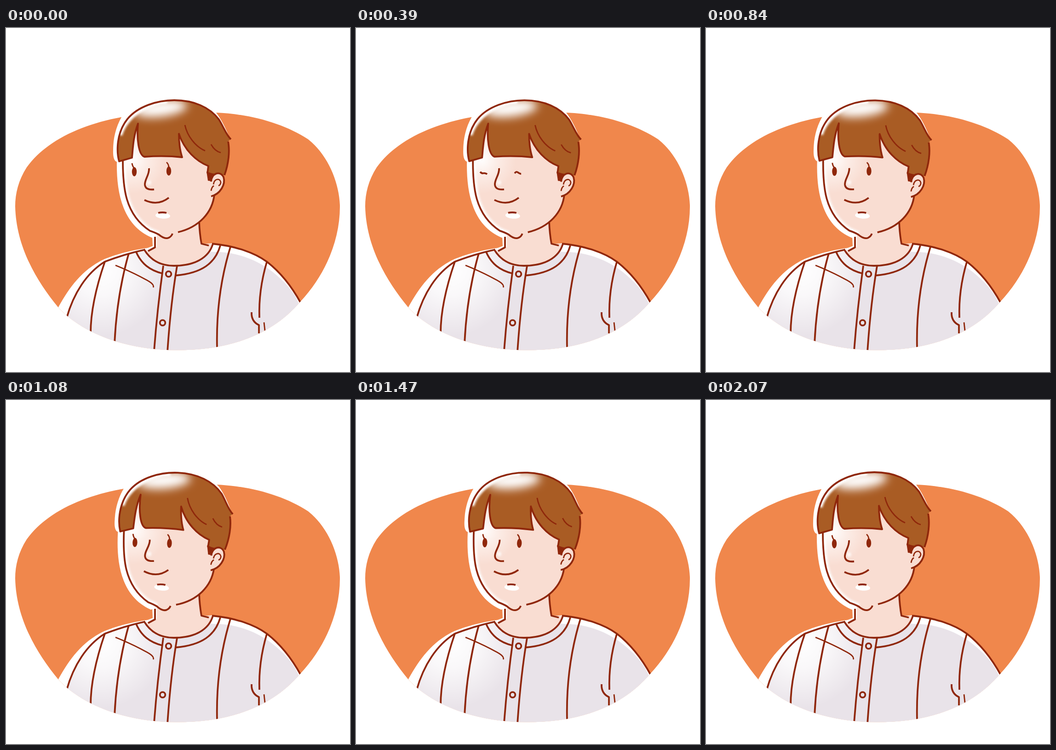
Write an HTML page that moves like this. It is 748 by 748 pixels and loops after 2100 ms.

```html
<!DOCTYPE html>
<html lang="en">
<head>
<meta charset="utf-8">
<title>Portrait</title>
<style>
  html, body { margin: 0; width: 100%; height: 100%; overflow: hidden; background: #fff; }
  svg { display: block; width: 100vw; height: 100vh; }
  .line { fill: none; stroke: #8f270b; stroke-width: 3.8; stroke-linejoin: round; }
  .thin { stroke-width: 2.8; }
  .ink { fill: #8f270b; }
</style>
</head>
<body>
<svg viewBox="0 0 748 748">
  <defs>
    <clipPath id="blobClip"><use href="#blob"/></clipPath>
    <clipPath id="hairClip"><use href="#hair"/></clipPath>
    <clipPath id="faceClip"><use href="#face"/></clipPath>
    <path id="blob" d="M250 194C163 210 86 246 45 303C27 331 20 360 20 388C22 475 66 550 114 608C165 663 260 700.5 370 700.5C480 700.5 575 672 641 594C695 536 727 460 726 385C724 335 700 276 657 242C603 207 530 187 457 184C385 180 310 183 250 194Z"/>
    <path id="hair" d="M246 290C240 268 240 228 264 198C286 171 328 157 366 157C408 157 443 172 463 199C473 215 479 233 488 241L483 247C487 268 484 295 476 320L450 318L438 315L440 300C414 290 388 266 376 232Q376 260 383 281Q345 277 301 280C288 276 284 240 287 208C277 235 276 258 274 282Z"/>
    <path id="face" d="M254 287C254 345 258 405 313 441Q325 445 332 449Q345 460 354 456Q360 453 361 447L374 444C420 433 448 400 453 364L470 330V260L380 200H270Z"/>
    <radialGradient id="shirtLight" gradientUnits="userSpaceOnUse" cx="205" cy="525" r="145">
      <stop offset="0" stop-color="#fff"/>
      <stop offset=".4" stop-color="#fff" stop-opacity=".75"/>
      <stop offset="1" stop-color="#fff" stop-opacity="0"/>
    </radialGradient>
    <radialGradient id="skin" gradientUnits="userSpaceOnUse" cx="272" cy="285" r="75">
      <stop offset="0" stop-color="#fff"/>
      <stop offset=".45" stop-color="#fcede7"/>
      <stop offset="1" stop-color="#f9ddd2"/>
    </radialGradient>
    <filter id="soft" x="-50%" y="-100%" width="200%" height="300%"><feGaussianBlur stdDeviation="10"/></filter>
    <filter id="crisp" x="-20%" y="-20%" width="140%" height="140%"><feGaussianBlur stdDeviation="2"/></filter>
  </defs>

  <use href="#blob" fill="#f0874c"/>

  <g clip-path="url(#blobClip)">
    <path fill="#fff" d="M110 614C135 568 163 526 215 502Q255 486 302 479L450 468C500 473 545 490 570 509C604 538 622 566 642 598V720H110Z"/>
    <path fill="#e9e3e9" d="M133 627C150 575 175 535 215 508Q260 490 304 482L460 487C505 488 548 506 578 529C605 550 628 575 637 600V720H133Z"/>
    <path fill="url(#shirtLight)" d="M133 627C150 575 175 535 215 508Q260 490 304 482L360 530V700H133Z"/>
    <g class="line">
      <path d="M132 630C147 577 175 533 215 508Q260 491 302 482"/>
      <path d="M448 469C500 474 541 489 567 508C602 535 624 567 641 598"/>
      <path d="M215 508Q184 598 184 664"/>
      <path d="M267 490Q241 580 236 686"/>
      <path d="M342 517Q329 610 322 702"/>
      <path d="M372 517Q358 600 351 704"/>
      <path d="M488 476Q456 580 459 697"/>
      <path d="M567 509Q549 570 551 630"/>
      <path d="M534 618Q533 638 550 646V664"/>
      <path class="thin" d="M561 640L563 658"/>
      <path class="thin" d="M238 516Q275 531 302 546Q324 557 320 564"/>
      <circle cx="353.5" cy="535" r="5.8"/>
      <circle cx="340.5" cy="641" r="5.8"/>
    </g>
  </g>

  <g class="head">
    <path fill="#fff" d="M487 240C476 215 469 200 457 184L420 150H290C252 178 233 220 233 265Q232 288 241 291C240 350 250 430 320 457L370 430Z"/>
  </g>

  <path fill="#fff" d="M318 452L329 448V480L304 484L306 479L319 474Z"/>
  <path fill="#f9ddd2" d="M328 438V476L304 485C319 510 342 517 365 517C410 517 442 500 450 470L424 468L419 405Z"/>
  <path class="line" d="M324 454V477L309 485M420 421Q421 447 425 469L441 473"/>
  <path class="line" d="M300 481C316 508 340 517 365 517C410 517 441 500 450 469M283 487C294 512 312 527 341 534M370 538C425 533 455 512 466 473"/>

  <g class="head">
    <use href="#face" fill="url(#skin)"/>
    <path clip-path="url(#faceClip)" d="M254 287C254 345 258 405 313 441L332 449" fill="none" stroke="#fff" stroke-width="13" filter="url(#crisp)"/>
    <path class="line" d="M254 287C254 345 258 405 313 441Q325 445 332 449Q345 460 354 456Q360 453 362 447M374 444C420 433 449 401 453 362"/>

    <use href="#hair" fill="#a95c24"/>
    <g clip-path="url(#hairClip)" fill="none" stroke="#fff">
      <ellipse cx="336" cy="175" rx="58" ry="18" transform="rotate(-7 336 175)" fill="#fff" stroke="none" filter="url(#soft)"/>
      <path d="M245 232Q250 214 264 198C286 171 328 157 350 157" stroke-width="16" filter="url(#crisp)"/>
    </g>
    <path class="line" d="M483 247C487 268 484 295 475 320M438 316L440 300C414 290 388 266 376 230Q376 260 383 281Q345 277 301 280C288 276 284 240 287 208C277 235 276 258 274 282L246 290C240 268 240 228 264 198C286 171 328 157 366 157C408 157 443 172 463 199C473 215 479 233 489 242"/>
    <path class="line thin" d="M389 211C394 235 412 258 433 267M446 253Q454 268 467 271"/>
    <path class="ink" d="M436 312Q446 316 454 317Q447 322 446 333L439 332Z"/>

    <path fill="#f9ddd2" d="M446 334C447 316 465 309 473 324C478 339 467 360 446 366Z"/>
    <path class="line" d="M446 334C447 316 465 309 473 324C478 340 466 361 446 366"/>
    <path class="line thin" d="M451 340C453 327 465 326 467 335Q467 341 462 343M446 354Q447 346 452 343"/>

    <circle cx="311" cy="336" r="4.5" fill="#fff" opacity=".8" filter="url(#crisp)"/>
    <path class="line" d="M311 305C312 320 301 329 302 341C303 350 312 352 322 351"/>
    <path class="line" d="M301 374Q330 388 354 369"/>
    <ellipse cx="341" cy="408" rx="16" ry="6.5" fill="#fff" transform="rotate(4 341 408)"/>
    <path class="line" d="M331 402Q340 400 349 402"/>

    <g id="open">
      <ellipse class="ink" cx="279" cy="312.5" rx="5.2" ry="10"/>
      <ellipse class="ink" cx="354" cy="311" rx="5.2" ry="10"/>
      <path class="line thin" d="M274 294Q275 301 279 305M349 292Q354 296 354 304"/>
    </g>
    <path id="shut" class="line" d="M270 313Q273 317 277 316T285 318M345 316Q348 311 352 314T359 317"/>
  </g>
</svg>
<script>
  const LOOP = 2100, STEP = 30;
  const PIVOT = '343 345', TILT = 2.4;
  // [time, value] pairs, eased between neighbours
  const tilt = [[0, 0], [390, .08], [720, .08], [1080, 1], [1380, 1], [1770, 0], [LOOP, 0]];
  const lids = [[0, 1], [240, 1], [360, 0], [420, 0], [600, .95], [900, 1], [LOOP, 1]];

  const heads = document.querySelectorAll('.head');
  const open = document.getElementById('open');
  const shut = document.getElementById('shut');

  function sample(keys, t) {
    const i = keys.findIndex(k => k[0] > t);
    const [t0, a] = keys[i - 1], [t1, b] = keys[i];
    const p = (t - t0) / (t1 - t0);
    return a + (b - a) * p * p * (3 - 2 * p);
  }

  function draw(t) {
    const angle = TILT * sample(tilt, t);
    heads.forEach(h => h.setAttribute('transform', `rotate(${angle} ${PIVOT})`));
    const lid = sample(lids, t), closed = lid < .15;
    open.setAttribute('transform', `translate(0 316) scale(1 ${lid}) translate(0 -316)`);
    open.style.display = closed ? 'none' : '';
    shut.style.display = closed ? '' : 'none';
  }

  const start = performance.now();
  function tick() {
    const t = (performance.now() - start) % LOOP;
    draw(Math.floor(t / STEP) * STEP);
    requestAnimationFrame(tick);
  }
  draw(0);
  requestAnimationFrame(tick);
</script>
</body>
</html>
```
